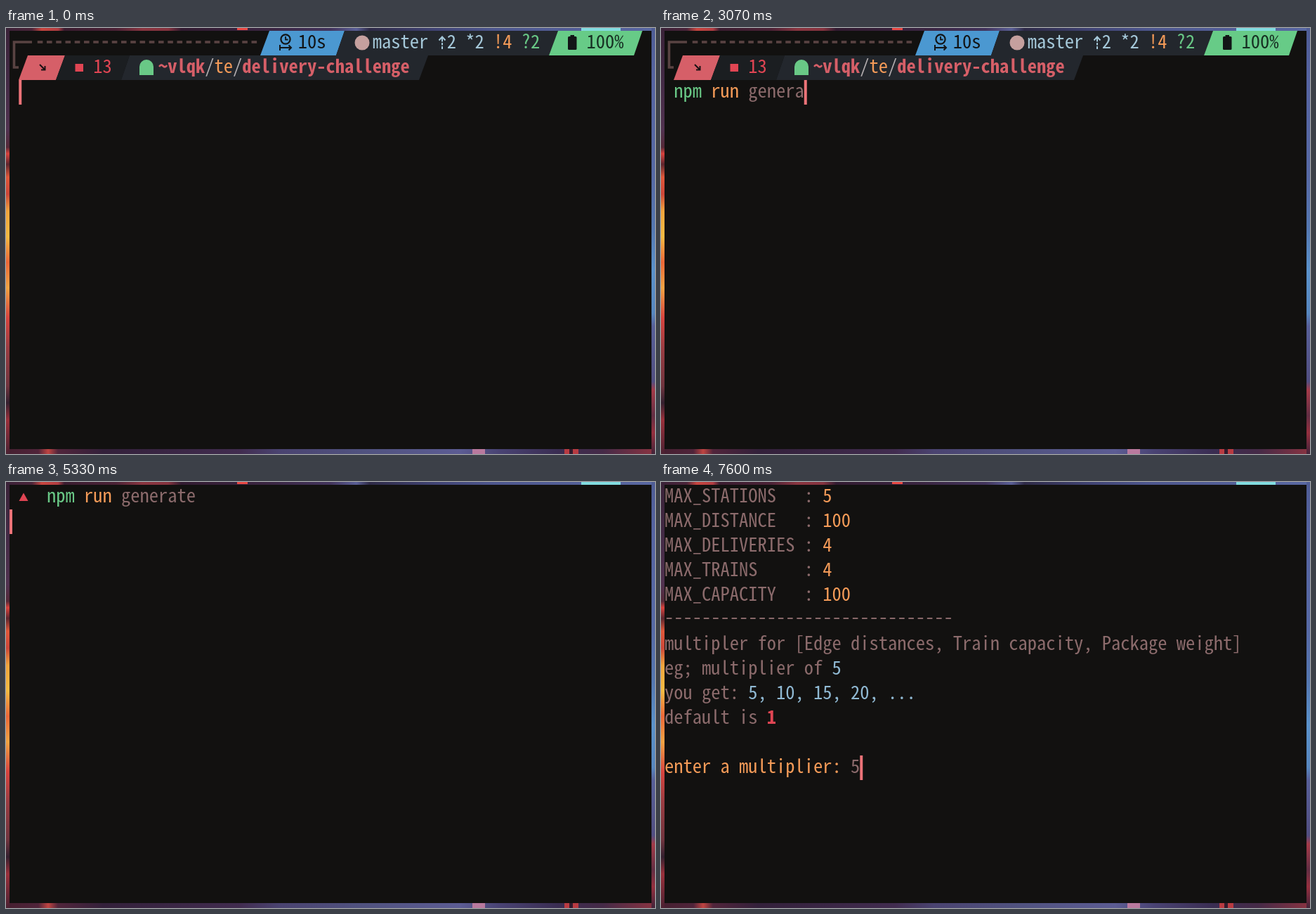
An HTML page that plays this animation: 924 by 606 pixels, repeating every 8000 ms.

```html
<!DOCTYPE html>
<html lang="en">
<head>
<meta charset="utf-8">
<title>Terminal</title>
<style>
html, body { margin: 0; width: 100%; height: 100%; overflow: hidden; background: #121110; }
svg { display: block; width: 100vw; height: 100vh; }
text { white-space: pre; font-variant-ligatures: none; }
</style>
</head>
<body>
<svg id="stage" viewBox="0 0 924 606" preserveAspectRatio="none"></svg>
<script>
const NS = 'http://www.w3.org/2000/svg';
const LOOP = 8000, CELL = 13.25, ROW = 35, LEFT = 5, TOP = 4;
const C = {
  bg: '#121110', dim: '#8c6b6c', green: '#69c886', orange: '#f59b58', blue: '#90b9d3',
  red: '#e04553', rose: '#d65f68', panel: '#23272d', ink: '#121517', cursor: '#ec7378'
};
const stage = document.getElementById('stage');

function add(parent, tag, attrs) {
  const el = document.createElementNS(NS, tag);
  for (const k in attrs) el.setAttribute(k, attrs[k]);
  return parent.appendChild(el);
}
const group = () => add(stage, 'g', {});
const box = (g, x, y, width, height, fill) => add(g, 'rect', { x, y, width, height, fill });
const path = (g, d, fill) => add(g, 'path', { d, fill });
const line = (g, d, stroke, width) =>
  add(g, 'path', { d, fill: 'none', stroke, 'stroke-width': width });
const colX = col => LEFT + col * CELL;

// Pick a half-em face when there is one, and keep every glyph on the cell grid.
const pen = document.createElement('canvas').getContext('2d');
function advance(family, weight) {
  pen.font = `${weight} 100px ${family}`;
  return pen.measureText('M'.repeat(10)).width / 1000;
}
const families = ['"Noto Sans Mono CJK JP", monospace', '"Noto Sans Mono CJK SC", monospace',
  '"Noto Sans Mono", monospace'];
const family = families.find(f => advance(f, 400) < 0.55) || families[2];
const ratio = advance(family, 400);
const size = ratio < 0.55 ? CELL / ratio : 23.5;
const spacing = {};
for (const w of [400, 700]) spacing[w] = CELL - size * advance(family, w);

function put(g, row, col, str, fill, weight = 400) {
  const el = add(g, 'text', {
    x: colX(col), y: TOP + ROW * row + 25.3, fill, 'font-family': family,
    'font-size': size, 'font-weight': weight, 'letter-spacing': spacing[weight]
  });
  el.textContent = str;
  return el;
}

// Wallpaper showing around the window: [offset %, colour] stops.
const defs = add(stage, 'defs', {});
function strip(id, x, y, w, h, stops) {
  const flat = w > h;
  const grad = add(defs, 'linearGradient', { id, x1: 0, y1: 0, x2: flat ? 1 : 0, y2: flat ? 0 : 1 });
  for (const [at, color] of stops) add(grad, 'stop', { offset: at + '%', 'stop-color': color });
  box(stage, x, y, w, h, `url(#${id})`);
}
box(stage, 0, 0, 924, 606, C.bg);
strip('top', 0, 0, 924, 4, [[0, '#3b2138'], [4, '#4a2439'], [5.5, '#c8453f'], [8, '#b23d42'],
  [9, '#3a1c30'], [17, '#4b2236'], [21, '#8a3540'], [25, '#86333f'], [27, '#321b31'], [40, '#3a2541'],
  [50, '#42345c'], [54, '#5a5f96'], [56, '#2e2a47'], [66, '#404373'], [75, '#4d568d'], [100, '#5968a2']]);
strip('bottom', 0, 599, 924, 7, [[0, '#451f30'], [5, '#50243a'], [6.5, '#c04441'], [8, '#51253b'],
  [15, '#33203a'], [36, '#412c4f'], [42, '#4a4370'], [55, '#50527f'], [70, '#5c5c93'], [76, '#494373'],
  [85, '#3a2d52'], [92, '#452a47'], [100, '#8a3341']]);
strip('left', 0, 0, 5, 606, [[0, '#3a2238'], [12, '#432a45'], [24, '#513250'], [28, '#552938'],
  [29.5, '#d9423d'], [32, '#5d252e'], [35, '#e0583a'], [39, '#cd4639'], [43, '#f2a53d'], [49, '#f5bb43'],
  [55, '#ed6839'], [61, '#f2a443'], [68, '#d8443f'], [75, '#9b3c42'], [84, '#70343e'], [88, '#34202f'],
  [92, '#9a303b'], [100, '#4b2132']]);
strip('right', 919, 0, 5, 606, [[0, '#4e5c94'], [12, '#5563a0'], [35, '#5669a4'], [47, '#5477b0'],
  [57, '#5a91ca'], [67, '#5786be'], [70, '#575f98'], [83, '#514e80'], [85, '#a33a48'], [91, '#622e43'],
  [95, '#942f3e'], [100, '#42243a']]);
box(stage, 329, 0, 15, 3, '#e94a45');
box(stage, 819, 0, 56, 4, '#82dce0');
box(stage, 664, 599, 18, 7, '#b9799e');
box(stage, 795, 599, 20, 7, '#b83b42');
box(stage, 802, 599, 5, 7, '#331b2e');

// Full prompt
const prompt = group();
const frame = '#594342';
line(prompt, 'M37 20H11.5V56H18', frame, 3.6);
for (let col = 3; col < 27; col++) box(prompt, colX(col), 18.2, 7.6, 3.6, frame);

path(prompt, 'M375 4H482L470 39H362Z', '#4b98d1');
path(prompt, 'M482 4H786L773 39H470Z', C.panel);
path(prompt, 'M786 4H906L894 39H773Z', '#67cb87');
path(prompt, 'M31 39H84L71 74H18Z', C.rose);
path(prompt, 'M84 39H176L164 74H71Z', '#1b1e21');
path(prompt, 'M176 39H601L588 74H164Z', C.panel);

add(prompt, 'circle', { cx: 398, cy: 16, r: 6.6, fill: 'none', stroke: C.ink, 'stroke-width': 2.2 });
line(prompt, 'M398 12V16.5H401.5', C.ink, 1.8);
line(prompt, 'M390 24V32M390 28H406M402.5 24.5L406 28L402.5 31.5', C.ink, 2);
put(prompt, 0, 31, '10s', C.ink);

add(prompt, 'circle', { cx: 507, cy: 21, r: 10.5, fill: '#c5a09e' });
put(prompt, 0, 39, 'master', '#a5c8d9');
add(line(prompt, 'M621 30V12', '#a5c8d9', 2), 'title', {}).remove();
line(prompt, 'M616.5 17.5L621 12.5L625.5 17.5', '#a5c8d9', 2);
box(prompt, 619, 19.5, 4, 1.6, C.panel);
box(prompt, 619, 24.5, 4, 1.6, C.panel);
put(prompt, 0, 47, '2', '#a5c8d9');
put(prompt, 0, 49, '*2', '#a5c8d9');
put(prompt, 0, 52, '!4', C.orange);
put(prompt, 0, 55, '?2', C.green);

add(prompt, 'rect', { x: 800, y: 12, width: 12.5, height: 19, rx: 1.5, fill: C.ink });
box(prompt, 803.5, 10, 5.5, 3, C.ink);
put(prompt, 0, 62, '100%', '#173023');

line(prompt, 'M48 52L55 59M55.5 54V59.5H50', '#1a1214', 2);
box(prompt, 98.5, 51, 11.5, 11, C.red);
put(prompt, 1, 9, '13', C.red);
path(prompt, 'M190 67V55A10 10 0 0 1 210 55V67Z', C.green);
put(prompt, 1, 16, '~vlqk', C.rose, 700);
put(prompt, 1, 21, '/', '#b3aeb0');
put(prompt, 1, 22, 'te', C.orange);
put(prompt, 1, 24, '/', '#b3aeb0');
put(prompt, 1, 25, 'delivery-challenge', C.rose, 700);
const words = [put(prompt, 2, 1, '', C.green), put(prompt, 2, 5, '', C.orange),
  put(prompt, 2, 9, '', C.dim)];

// Collapsed prompt while the command starts
const started = group();
path(started, 'M25 15.5L31.5 27H18.5Z', C.red);
put(started, 0, 4, 'npm', C.green);
put(started, 0, 8, 'run', C.orange);
put(started, 0, 12, 'generate', C.dim);

// Program output
const output = group();
const limits = { STATIONS: 5, DISTANCE: 100, DELIVERIES: 4, TRAINS: 4, CAPACITY: 100 };
Object.entries(limits).forEach(([name, value], row) => {
  put(output, row, 0, ('MAX_' + name).padEnd(15) + ':', C.dim);
  put(output, row, 17, value, C.orange);
});
put(output, 5, 0, '-'.repeat(31), C.dim).setAttribute('dy', -3);
put(output, 6, 0, 'multipler for [Edge distances, Train capacity, Package weight]', C.dim);
put(output, 7, 0, 'eg; multiplier of', C.dim);
put(output, 7, 18, '5', C.blue);
put(output, 8, 0, 'you get:', C.dim);
put(output, 8, 9, '5, 10, 15, 20, ...', C.blue);
put(output, 9, 0, 'default is', C.dim);
put(output, 9, 11, '1', C.red, 700);
put(output, 11, 0, 'enter a multiplier:', C.orange);
const answer = put(output, 11, 20, '5', C.dim);

const cursor = box(stage, 0, 0, 4, ROW, C.cursor);

const COMMAND = 'npm run generate ';
const KEYS = [530, 800, 1000, 1330, 1470, 1600, 1730, 1870,
  2130, 2270, 2400, 2670, 2800, 3000, 3130, 3270, 3400];
const RUN = 5070, PRINT = 5530, REPLY = 7470;

const show = (el, on) => el.setAttribute('display', on ? 'inline' : 'none');
function moveCursor(row, col) {
  cursor.setAttribute('x', colX(col));
  cursor.setAttribute('y', TOP + row * ROW);
}

function render(t) {
  show(prompt, t < RUN);
  show(started, t >= RUN && t < PRINT);
  show(output, t >= PRINT);
  if (t < RUN) {
    const count = KEYS.filter(k => k <= t).length;
    const typed = COMMAND.slice(0, count).split(' ');
    words.forEach((el, i) => { el.textContent = typed[i] || ''; });
    words[0].setAttribute('fill', typed[0] === 'npm' ? C.green : C.red);
    words[1].setAttribute('fill', typed[1] === 'run' ? C.orange : C.dim);
    moveCursor(2, 1 + count);
  } else if (t < PRINT) {
    moveCursor(1, 0);
  } else {
    show(answer, t >= REPLY);
    moveCursor(11, t >= REPLY ? 21 : 20);
  }
}

function tick(now) {
  render(now % LOOP);
  requestAnimationFrame(tick);
}
render(0);
requestAnimationFrame(tick);
</script>
</body>
</html>
```
